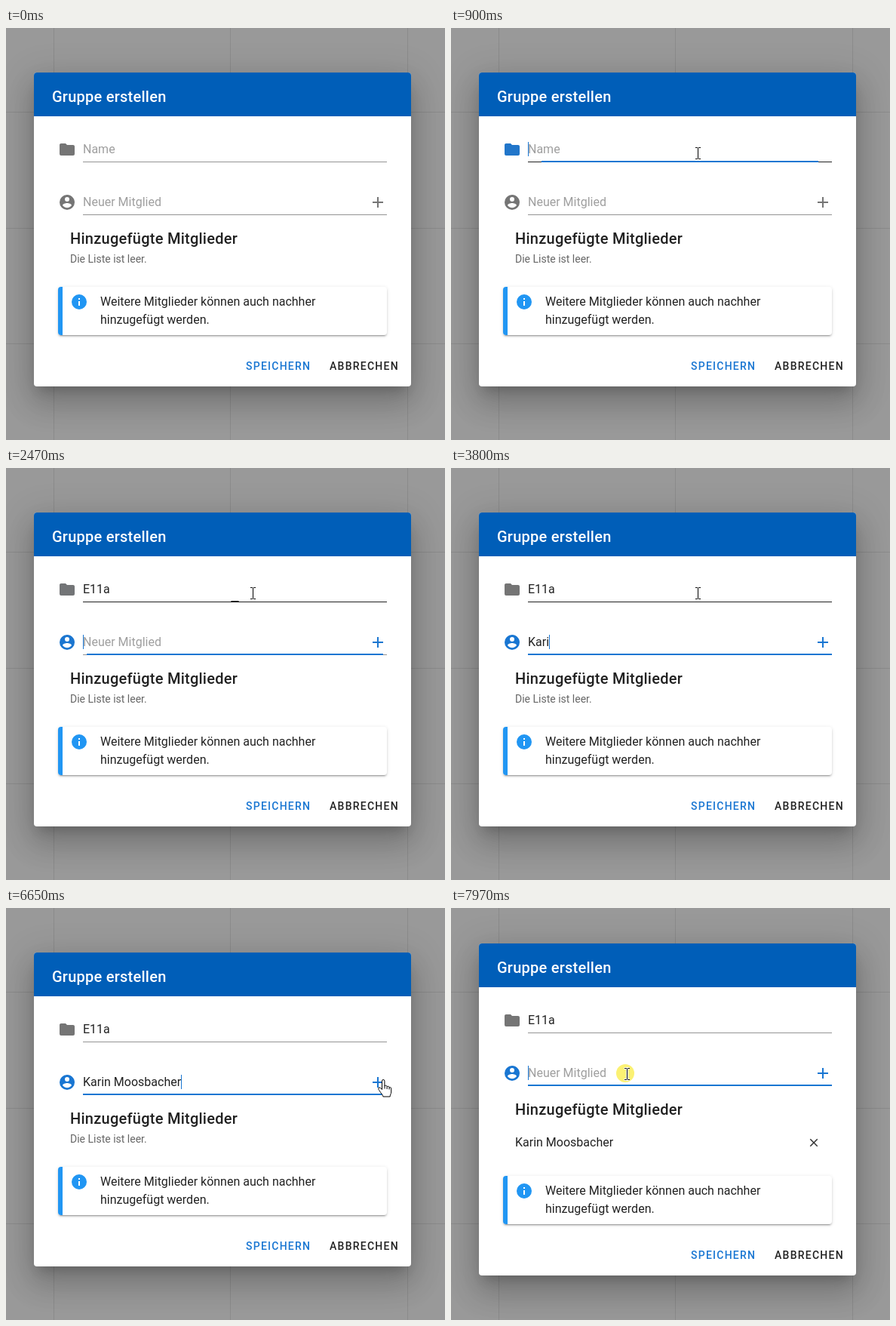
These frames come from a looping animation (582 px wide and 546 px high, 8000 ms). An HTML page:

```html
<!DOCTYPE html>
<html lang="de">
<head>
<meta charset="utf-8">
<title>Gruppe erstellen</title>
<style>
html, body { margin: 0; width: 100%; height: 100%; overflow: hidden; background: #999; }
div, svg { position: absolute; }
svg { left: 0; top: 0; overflow: visible; }
#dialog {
  left: 37px; width: 500px; border-radius: 4px; background: #fff;
  box-shadow: 0 11px 15px -7px rgba(0,0,0,.2), 0 24px 38px 3px rgba(0,0,0,.14), 0 9px 46px 8px rgba(0,0,0,.12);
}
#head { width: 500px; height: 58px; border-radius: 4px 4px 0 0; background: #005eb8; }
#alert {
  left: 32px; width: 430px; height: 64px; border-left: 6px solid #2196f3; border-radius: 4px;
  box-shadow: 0 3px 1px -2px rgba(0,0,0,.2), 0 2px 2px rgba(0,0,0,.14), 0 1px 5px rgba(0,0,0,.12);
}
text { font: 16px Roboto, sans-serif; fill: rgba(0,0,0,.87); white-space: pre; }
.title { font-size: 20px; font-weight: 500; letter-spacing: .0125em; }
.small { font-size: 14px; fill: rgba(0,0,0,.6); }
.button { font-size: 14px; font-weight: 500; letter-spacing: .0892857em; }
path { fill-rule: evenodd; }
#spot { fill: #fbf173; mix-blend-mode: multiply; }
</style>
</head>
<body>
<svg width="582" height="546">
  <path d="M63.5 0V546M297.5 0V546M532.5 0V546M0 111.5H582M0 265.5H582M0 418.5H582" stroke="#8b8b8b"/>
</svg>

<div id="dialog">
  <div id="head"></div>
  <div id="alert"></div>
  <svg width="500" height="440" viewBox="37 59 500 440">
    <text class="title" x="61" y="98" style="fill:#fff">Gruppe erstellen</text>
    <g class="field">
      <path class="icon" transform="translate(69 149)" d="M10,4H4C2.89,4 2,4.89 2,6V18A2,2 0 0,0 4,20H20A2,2 0 0,0 22,18V8C22,6.89 21.1,6 20,6H12L10,4Z"/>
      <text x="102" y="166"></text>
      <rect class="line" x="102" y="177" width="403" height="1"/>
      <rect class="focus" y="176" height="2"/>
      <rect class="caret" y="151" width="1" height="19" fill="#1976d2"/>
    </g>
    <g class="field" transform="translate(0 70)">
      <path class="icon" transform="translate(69 149)" d="M12,19.2C9.5,19.2 7.29,17.92 6,16C6.03,14 10,12.9 12,12.9C14,12.9 17.97,14 18,16C16.71,17.92 14.5,19.2 12,19.2M12,5A3,3 0 0,1 15,8A3,3 0 0,1 12,11A3,3 0 0,1 9,8A3,3 0 0,1 12,5M12,2A10,10 0 0,0 2,12A10,10 0 0,0 12,22A10,10 0 0,0 22,12C22,6.47 17.5,2 12,2Z"/>
      <path class="icon" transform="translate(481 149)" d="M19,13H13V19H11V13H5V11H11V5H13V11H19V13Z"/>
      <text x="102" y="166"></text>
      <rect class="line" x="102" y="177" width="403" height="1"/>
      <rect class="focus" y="176" height="2"/>
      <rect class="caret" y="151" width="1" height="19" fill="#1976d2"/>
    </g>
    <text class="title" x="85" y="286">Hinzugefügte Mitglieder</text>
    <text id="empty" class="small" x="85" y="311">Die Liste ist leer.</text>
    <g id="member">
      <text x="85" y="328">Karin Moosbacher</text>
      <path transform="translate(472 314) scale(.75)" fill="rgba(0,0,0,.8)" d="M19,6.41L17.59,5L12,10.59L6.41,5L5,6.41L10.59,12L5,17.59L6.41,19L12,13.41L17.59,19L19,17.59L13.41,12L19,6.41Z"/>
    </g>
    <g id="lower">
      <path transform="translate(85 351)" fill="#2196f3" d="M13,9H11V7H13M13,17H11V11H13M12,2A10,10 0 0,0 2,12A10,10 0 0,0 12,22A10,10 0 0,0 22,12A10,10 0 0,0 12,2Z"/>
      <text x="125" y="368">Weitere Mitglieder können auch nachher</text>
      <text x="125" y="392">hinzugefügt werden.</text>
      <text class="button" x="318" y="453" style="fill:#1976d2">SPEICHERN</text>
      <text class="button" x="429" y="453">ABBRECHEN</text>
    </g>
  </svg>
</div>

<svg width="582" height="546">
  <circle id="spot" r="12"/>
  <g id="pointer" fill="#fff" stroke="#000" stroke-linejoin="round">
    <path id="arrow" d="M.5 .5V16.5L4 13.2L6.4 18.8L8.7 17.8L6.3 12.2H11.3Z"/>
    <g id="beam" fill="none">
      <path stroke="#fff" stroke-width="3" d="M-3.5 -7.5H3.5M.5 -7V7M-3.5 7.5H3.5"/>
      <path d="M-3 -7.5H0M1 -7.5H4M.5 -7V7M-3 7.5H0M1 7.5H4"/>
    </g>
    <path id="hand" d="M-1.5 12.5V1.2a1.7 1.7 0 0 1 3.4 0V8c.3-1.2 3-1.1 3.2.5V9c.3-1 2.8-1 3 .6V10.2c.3-.9 2.6-.8 2.6 1V16c0 2-1.5 3.5-1.6 6H0c-.2-2.2-3-4.5-4.5-7.2C-5.6 13-7 11.5-6 10.4c1.2-1.2 3 .2 4.5 2.1ZM2 8V11.5M5.1 9V12M8.1 10V12.5"/>
  </g>
</svg>

<script>
const LOOP = 8000, BLINK = 530, ADDED = 6900;
const $ = id => document.getElementById(id);
const show = (el, on) => { el.style.display = on ? '' : 'none'; };
const clamp = v => Math.min(1, Math.max(0, v));

// Each field: focus span, hover span, typed text and the time of each key
const fields = [
  { hint: 'Name', focus: [733, 2250], hover: [620, 6220], text: 'E11a', keys: [1220, 1470, 1590, 1900] },
  { hint: 'Neuer Mitglied', focus: [2250, Infinity], hover: [6430, 7990], text: 'Karin Moosbacher', clear: ADDED,
    keys: [3170, 3420, 3620, 3800, 3920, 4050, 4240, 4440, 4540, 4640, 4830, 4940, 5140, 5240, 5340, 5430] }
];
document.querySelectorAll('.field').forEach((el, i) => {
  const f = fields[i], get = name => el.querySelector(name);
  Object.assign(f, { label: get('text'), line: get('.line'), bar: get('.focus'), caret: get('.caret'),
    icons: el.querySelectorAll('.icon') });
});

// Pointer stops: time, x, y
const stops = [[60, 380, 499], [700, 327, 166], [6050, 327, 166], [6650, 500, 228], [6720, 499, 230],
  [7040, 499, 230], [7720, 249, 209], [7790, 233, 220]];
const clicks = [[720, 850], [6720, ADDED], [7960, LOOP]];

// cubic-bezier(.25, .8, .5, 1) over 300 ms
function ramp(ms) {
  const x = clamp(ms / 300);
  const bez = (s, a, b) => 3 * (1 - s) ** 2 * s * a + 3 * (1 - s) * s * s * b + s ** 3;
  let lo = 0, hi = 1;
  for (let i = 0; i < 16; i++) {
    const mid = (lo + hi) / 2;
    if (bez(mid, .25, .5) < x) lo = mid; else hi = mid;
  }
  return x === 1 ? 1 : bez(lo, .8, 1);
}
const during = ([from, to], t) => ramp(t - from) - ramp(t - to);

function pointerAt(t) {
  const next = stops.findIndex(s => s[0] > t);
  if (next < 0) return stops[stops.length - 1].slice(1);
  const [t0, x0, y0] = stops[next - 1], [t1, x1, y1] = stops[next];
  const u = (t - t0) / (t1 - t0), k = u * u * (3 - 2 * u);
  return [x0 + (x1 - x0) * k, y0 + (y1 - y0) * k];
}

function drawField(f, t) {
  const cleared = t >= f.clear;
  const value = cleared ? '' : f.text.slice(0, f.keys.filter(k => k <= t).length);
  f.label.textContent = value || f.hint;
  f.label.style.fill = value ? '' : 'rgba(0,0,0,.38)';

  const focused = t >= f.focus[0] && t < f.focus[1];
  const amount = during(f.focus, t), mix = (a, b) => a + (b - a) * amount;
  f.icons.forEach(icon => icon.setAttribute('fill', `rgb(${mix(117, 25)},${mix(117, 118)},${mix(117, 210)})`));
  f.line.setAttribute('fill', `rgba(0,0,0,${.42 + .45 * during(f.hover, t)})`);
  f.bar.setAttribute('x', 303.5 - 201.5 * amount);
  f.bar.setAttribute('width', 403 * amount);
  f.bar.setAttribute('fill', focused ? '#1976d2' : 'rgba(0,0,0,.87)');

  const last = Math.max(...[f.focus[0], ...f.keys, f.clear || 0].filter(k => k <= t));
  show(f.caret, focused && Math.floor((t - last) / BLINK) % 2 === 0);
  f.caret.setAttribute('x', Math.round(102 + (value ? f.label.getComputedTextLength() : 0)));
}

function drawPointer(t, top) {
  const visible = t >= stops[0][0];
  show($('pointer'), visible);
  show($('spot'), clicks.some(([a, b]) => t >= a && t < b));
  if (!visible) return;
  const [x, y] = pointerAt(t), row = y - top + 59;
  const inside = (a, b) => row > a && row < b && x > 102 && x < 505;
  const lower = inside(214, 248);
  const kind = lower && x > 481 ? 'hand' : lower || inside(145, 178) ? 'beam' : 'arrow';
  for (const name of ['arrow', 'beam', 'hand']) show($(name), name === kind);
  $('pointer').setAttribute('transform', `translate(${Math.round(x)} ${Math.round(y)})`);
  $('spot').setAttribute('transform', `translate(${x - 2} ${y - 1})`);
}

function draw(t) {
  const added = t >= ADDED, top = added ? 47 : 59, drop = added ? 24 : 0;
  $('dialog').style.top = top + 'px';
  $('dialog').style.height = 416 + drop + 'px';
  $('alert').style.top = 284 + drop + 'px';
  $('lower').setAttribute('transform', `translate(0 ${drop})`);
  show($('empty'), !added);
  show($('member'), added);
  fields.forEach(f => drawField(f, t));
  drawPointer(t, top);
}

const start = performance.now();
function tick() {
  draw((performance.now() - start) % LOOP);
  requestAnimationFrame(tick);
}
tick();
</script>
</body>
</html>
```
